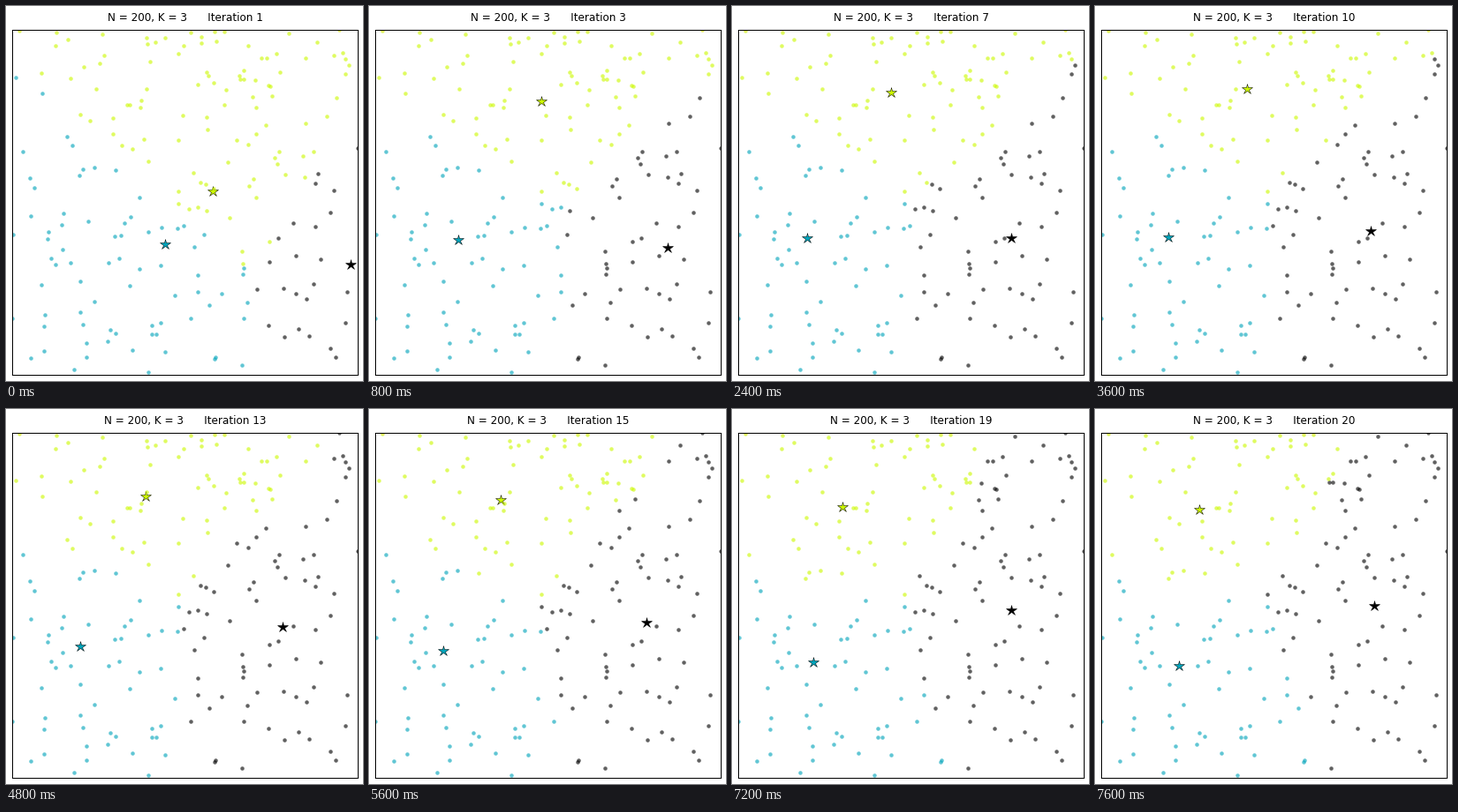
These frames come from a looping animation (404x425 px, 8000 ms). A matplotlib script:

```python
import numpy as np
import matplotlib.pyplot as plt
from matplotlib.animation import FuncAnimation

WIDTH, HEIGHT, DPI = 404, 425, 72
LEFT, TOP, SIDE = 7, 27, 391
N, K, ITERATIONS = 200, 3, 20

# Waypoints of the black, teal and yellow centres, in pixels.
WAYPOINTS = {
    1: [(390, 293), (180, 270), (234, 210)],
    2: [(359, 275), (116, 257), (206, 119)],
    3: [(338, 274), (101, 265), (195, 108)],
    5: [(319, 268), (87, 263), (186, 100)],
    10: [(312, 255), (83, 262), (172, 94)],
    17: [(315, 237), (85, 279), (140, 106)],
    20: [(316, 223), (95, 291), (118, 114)],
}


def make_points():
    """Scatter points over the box, a little denser towards the top."""
    rng = np.random.default_rng(3)
    x, y = rng.random((2, N))
    return np.column_stack([LEFT + SIDE * x, TOP + SIDE * y ** 1.25])


def centres_at(iteration):
    steps = list(WAYPOINTS)
    paths = np.reshape(list(WAYPOINTS.values()), (len(steps), -1)).T
    return np.reshape([np.interp(iteration, steps, p) for p in paths], (K, 2))


points = make_points()

fig = plt.figure(figsize=(WIDTH / DPI, HEIGHT / DPI), dpi=DPI, facecolor="white")
ax = fig.add_axes([LEFT / WIDTH, 1 - (TOP + SIDE) / HEIGHT,
                   SIDE / WIDTH, SIDE / HEIGHT])
ax.set(xlim=(LEFT, LEFT + SIDE), ylim=(TOP + SIDE, TOP), xticks=[], yticks=[])
for spine in ax.spines.values():
    spine.set_linewidth(1)
title = fig.text((LEFT + SIDE / 2 + 0.5) / WIDTH, 1 - 17 / HEIGHT, "",
                 ha="center", va="baseline", size=12, family="DejaVu Sans")

stars, dots = [], []
for k in range(K):
    color = plt.cm.nipy_spectral(k / K)
    stars += ax.plot([], [], "*", ms=12, color=color, mec="black", mew=0.5)
    dots += ax.plot([], [], ".", ms=9, color=color, mew=0, alpha=0.62)


def update(frame):
    iteration = frame + 1
    centres = centres_at(iteration)
    distances = np.linalg.norm(points[:, None] - centres, axis=2)
    nearest = distances.argmin(axis=1)
    for k in range(K):
        stars[k].set_data(*centres[k][:, None])
        dots[k].set_data(*points[nearest == k].T)
    title.set_text(f"N = {N}, K = {K}      Iteration {iteration}")
    return [*stars, *dots, title]


anim = FuncAnimation(fig, update, frames=ITERATIONS, interval=400,
                     repeat=True, repeat_delay=0)
plt.show()
```
